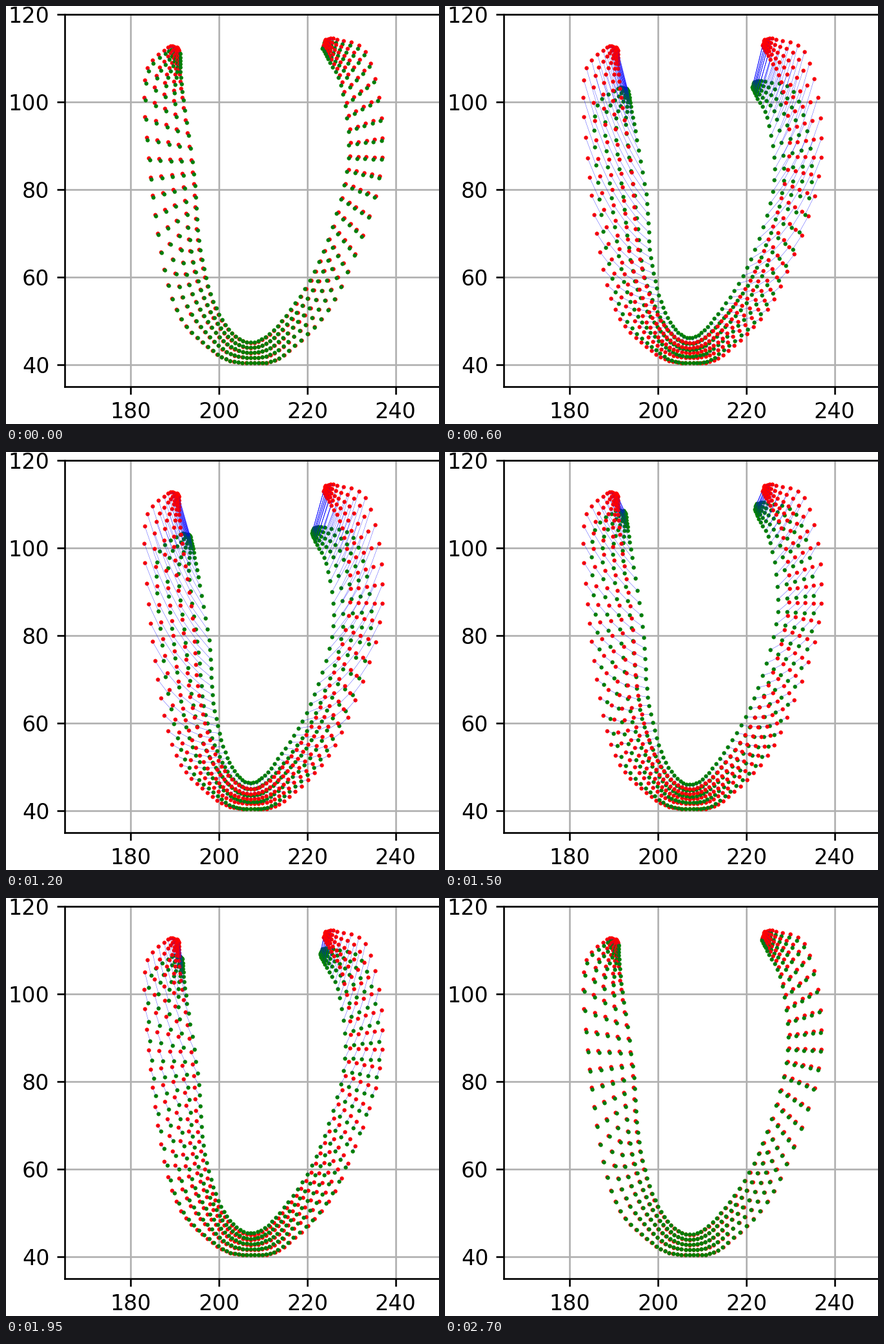
Recreate the animation shown at these times as a matplotlib script. Size 671x649 px, loop 2850 ms.

```python
import numpy as np
import matplotlib.pyplot as plt
from matplotlib.animation import FuncAnimation

W, H, DPI = 671, 649, 240
FRAMES, INTERVAL = 19, 150
LEFT, BOTTOM, XUNIT, YUNIT = 90.8, 591, 6.84, 6.8   # axes corner and pixels per unit
STATIONS, APEX, LAYERS = 79, 39, 5

# Key points of the wall: station, outer x and y, inner x and y (pixels)
WALL = np.array([
    (0, 265, 64, 268, 69), (6, 245, 69, 269, 106), (9, 219, 96, 273, 142),
    (15, 224, 266, 289, 258), (22, 257, 454, 299, 378), (30, 320, 535, 329, 479),
    (39, 379, 554, 379, 523),
    (48, 439, 535, 435, 481), (56, 520, 435, 494, 380), (63, 583, 235, 533, 233),
    (69, 557, 71, 521, 118), (73, 513, 52, 504, 83), (78, 495, 52, 492, 61)], float)


def spline(s, knots, points):
    """Smooth cubic curve through points placed at uneven knots."""
    m = np.gradient(points, knots, axis=0)
    i = np.clip(np.searchsorted(knots, s, side="right") - 1, 0, len(knots) - 2)
    h = (knots[i + 1] - knots[i])[:, None]
    t = (s - knots[i])[:, None] / h
    return ((2*t**3 - 3*t**2 + 1) * points[i] + (t**3 - 2*t**2 + t) * h * m[i]
            + (3*t**2 - 2*t**3) * points[i + 1] + (t**3 - t**2) * h * m[i + 1])


def eased(time, *keys):
    """Cosine easing between (time, level) keys."""
    for (t0, a), (t1, b) in zip(keys, keys[1:]):
        if time <= t1:
            return a + (b - a) * (1 - np.cos(np.pi * (time - t0) / (t1 - t0))) / 2


def to_data(p):
    return 165 + (p[:, 0] - LEFT) / XUNIT, 35 + (BOTTOM - p[:, 1]) / YUNIT


station = np.arange(STATIONS)
curves = spline(station, WALL[:, 0], WALL[:, 1:])
depth = np.linspace(0, 1, LAYERS)[:, None]          # 0 outside, 1 inside
rest = (1 - depth[..., None]) * curves[:, :2] + depth[..., None] * curves[:, 2:]

# Full contraction: the wall thickens inwards while the base sinks to the apex
v = (station - APEX) / APEX
squeeze = np.stack([
    -20 * np.sin(1.9 * v) - 9 * depth * np.sin(np.pi * v),
    -4 * np.sin(np.pi * v)**2 - 12 * depth * np.exp(-(v / 0.5)**4)], axis=-1)
descent = np.zeros_like(rest)
descent[..., 1] = 77 * np.clip((540 - rest[..., 1]) / 480, 0, None)

plt.rcParams["font.family"] = "DejaVu Sans"
fig = plt.figure(figsize=(W / DPI, H / DPI), dpi=DPI, facecolor="white")
ax = fig.add_axes([LEFT / W, 1 - BOTTOM / H, 85 * XUNIT / W, 85 * YUNIT / H])
ax.set(xlim=(165, 250), ylim=(35, 120),
       xticks=range(180, 241, 20), yticks=range(40, 121, 20))
ax.grid(True)

dots = dict(ls="", marker="o", ms=1.9, mew=0)
moving, links = [], []
for layer in rest:
    ax.plot(*to_data(layer), color="red", **dots)
    moving += ax.plot([], [], color="green", **dots)
    links += ax.plot([], [], color="blue", lw=0.1)


def update(i):
    tight = eased(i, (0, 0.08), (5.5, 1), (7, 1), (13, 0.29), (18, 0.07))
    sunk = eased(i, (0, 0.07), (5.5, 1), (7, 1), (10, 0.36), (13, 0.35), (18, 0.065))
    now = rest + tight * squeeze + sunk * descent
    for start, end, points, link in zip(rest, now, moving, links):
        points.set_data(*to_data(end))
        gaps = np.full_like(start, np.nan)
        link.set_data(*to_data(np.stack([start, end, gaps], axis=1).reshape(-1, 2)))
    return moving + links


anim = FuncAnimation(fig, update, frames=FRAMES, interval=INTERVAL,
                     repeat=True, repeat_delay=0)
plt.show()
```
